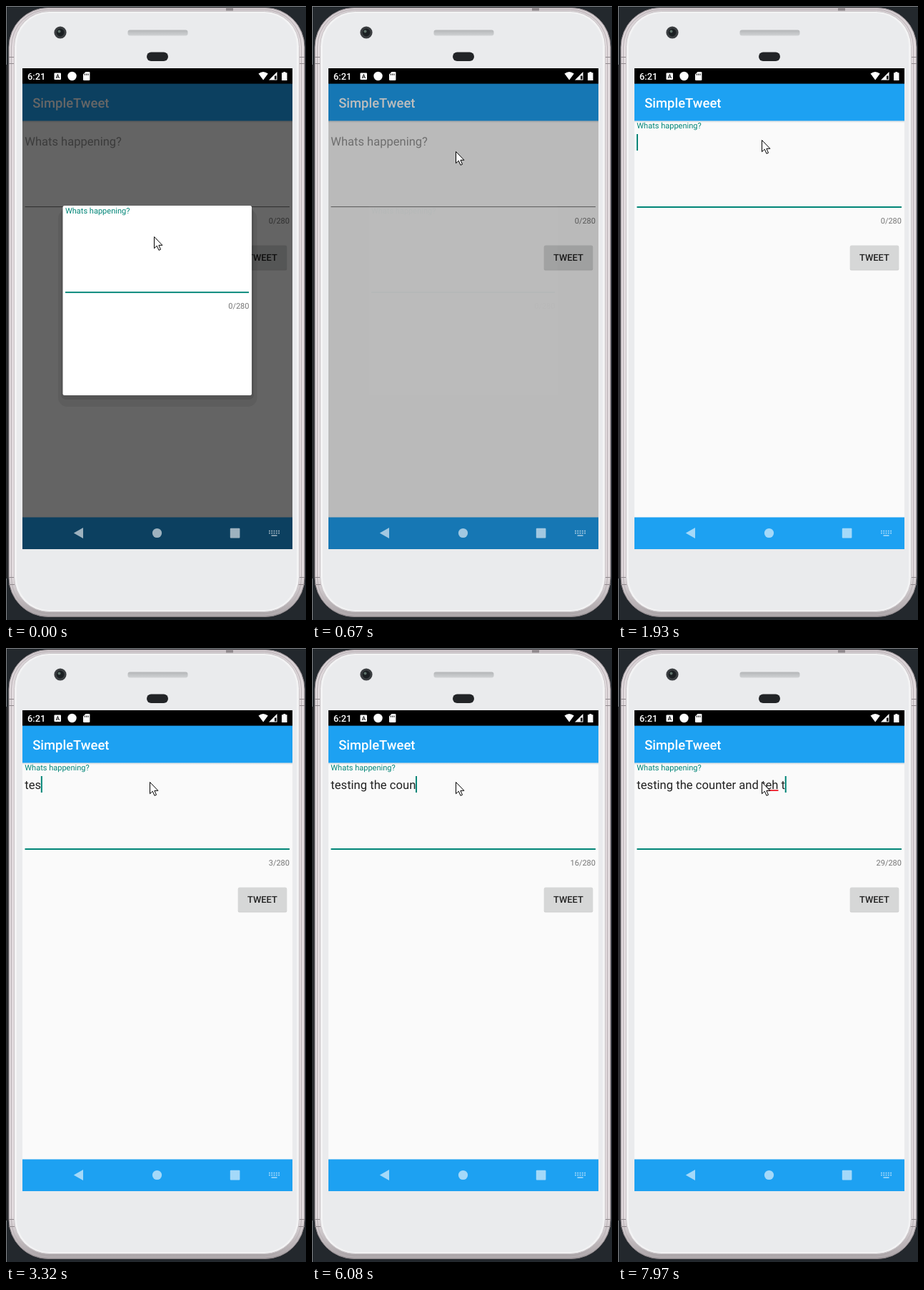
Recreate the animation shown at these times as an HTML page. Size 420 px wide and 858 px high, loop 8000 ms.

```html
<!DOCTYPE html>
<html lang="en">
<head>
<meta charset="utf-8">
<title>Compose screen</title>
<style>
html, body { margin: 0; width: 100%; height: 100%; overflow: hidden; background: #23282d; }
svg { display: block; width: 100%; height: 100%; }
text { font-family: Roboto, sans-serif; white-space: pre; text-rendering: geometricPrecision; }
.medium { font-weight: 500; }
.small { font-size: 11.03px; }
.body { font-size: 16.64px; }
.count { fill: #757575; text-anchor: end; }
.teal { fill: #008577; }
</style>
</head>
<body>
<svg viewBox="0 0 420 858" preserveAspectRatio="none">
  <defs>
    <linearGradient id="rim" x2="0" y2="1">
      <stop offset="0" stop-color="#d3ccd0"/><stop offset=".06" stop-color="#e2dbde"/>
      <stop offset=".93" stop-color="#e2dbde"/><stop offset="1" stop-color="#a8a2a5"/>
    </linearGradient>
    <linearGradient id="slot" x2="0" y2="1">
      <stop offset="0" stop-color="#b4b6b8"/><stop offset="1" stop-color="#d0d2d4"/>
    </linearGradient>
    <linearGradient id="barShade" x2="0" y2="1">
      <stop offset="0" stop-opacity=".13"/><stop offset="1" stop-opacity="0"/>
    </linearGradient>
  </defs>

  <!-- phone -->
  <rect width="420" height="858" fill="#23282d"/>
  <path d="M0 .5H420M.5 0V858" stroke="#85878a" fill="none"/>
  <path d="M1.5 82V800" stroke="#2c2d30" stroke-width="3"/>
  <rect x="4" y="2.5" width="414" height="851" rx="55" fill="url(#rim)" stroke="#8d8589"/>
  <rect x="7.5" y="5" width="406" height="846" rx="52" fill="none" stroke="#b9b1b5"/>
  <path d="M4 71.5H12M4 80.5H12M409 71.5H418M409 80.5H418M4 798.5H12M4 808.5H12M409 798.5H418M409 808.5H418" stroke="#8f888c"/>
  <path d="M308 4.5H318" stroke="#8f888c" stroke-width="4"/>
  <rect x="11.5" y="7.5" width="399" height="839" rx="49" fill="#f3f3f4" stroke="#c9c4c7"/>
  <rect x="15" y="10" width="392" height="834" rx="46" fill="#eaebed"/>
  <circle cx="76" cy="37" r="8.6" fill="#3b3e41"/>
  <circle cx="76" cy="37" r="5.4" fill="#1b1f22"/>
  <circle cx="74.5" cy="35.5" r="2" fill="#5d7068"/>
  <rect x="170.5" y="33.5" width="84" height="8" rx="3" fill="url(#slot)"/>
  <rect x="197" y="64.5" width="30" height="12.5" rx="6.2" fill="#222427"/>

  <!-- app -->
  <rect x="23" y="87" width="378" height="672" fill="#fafafa"/>
  <rect x="23" y="160.4" width="378" height="3" fill="url(#barShade)"/>
  <path d="M23 108H401V160.4H23ZM23 714.4H401V759H23Z" fill="#1da1f2"/>
  <text class="medium" x="37.2" y="141.6" font-size="18.45" fill="#fff">SimpleTweet</text>
  <text id="label">Whats happening?</text>
  <rect id="line" x="26.5" width="370.5"/>
  <text id="typed" class="body" x="26.3" y="197" fill="#212121"></text>
  <rect id="typo" y="198" height="2" fill="#f0303c"/>
  <rect id="caret" class="teal" y="179" width="2" height="23"/>
  <text id="count" class="small count" x="397" y="304"></text>
  <rect x="324.7" y="335" width="68.6" height="34.6" rx="2" opacity=".16"/>
  <rect x="325" y="334.5" width="68" height="33.5" rx="2" fill="#d6d7d7"/>
  <text class="medium" x="338" y="356.2" font-size="12.87" fill="#212121">TWEET</text>

  <!-- dialog -->
  <rect id="dim" x="23" y="108" width="378" height="651"/>
  <g id="dialog">
    <rect x="73" y="284" width="278.5" height="276" rx="13" opacity=".07"/>
    <rect x="77" y="281" width="270" height="269" rx="7" opacity=".1"/>
    <rect x="79.5" y="279" width="264.5" height="265" rx="2.5" fill="#fff"/>
    <text class="small teal" x="83" y="290">Whats happening?</text>
    <rect class="teal" x="83" y="399.2" width="257" height="1.9"/>
    <text class="small count" x="340.5" y="423">0/280</text>
  </g>

  <!-- status bar -->
  <rect x="23" y="87" width="378" height="21.6"/>
  <g fill="#fff">
    <text class="medium" x="30" y="103" font-size="12.87">6:21</text>
    <rect x="67.5" y="93.5" width="9.5" height="9.5" rx="1"/>
    <circle cx="92.5" cy="98" r="6.2"/>
    <path d="M111.5 92H116.2Q117.4 92 117.4 93.2V102.8Q117.4 104 116.2 104H109.2Q108 104 108 102.8V95.5Z"/>
    <path d="M353.5 94.6Q360 89.6 366.8 94.6L360.2 103.4Z"/>
    <path d="M379.5 92V103.5H368Z"/>
    <path d="M388.3 92H391.3V93.3H393.5V104H386V93.3H388.3Z"/>
  </g>
  <text class="medium" x="72.3" y="101.2" font-size="8" text-anchor="middle">A</text>
  <path d="M376 97.5H378.5V102.5H376Z"/>
  <path d="M110.3 94.6V96.8M112.7 94.6V96.8M115 94.6V96.8" stroke="#000"/>

  <!-- navigation bar -->
  <g fill="#fff" opacity=".6">
    <path d="M94.8 736.5L108 729V744Z"/>
    <circle cx="211.5" cy="736.5" r="6.6"/>
    <rect x="313.8" y="729.8" width="13.6" height="13.6" rx="1"/>
    <g id="keys" fill="none" stroke="#fff" stroke-width="1.6">
      <path d="M368 733.6H383M368 736.6H383" stroke-dasharray="1.8 1.5"/>
      <path d="M371.5 740H379.5"/>
    </g>
  </g>

  <path id="mouse" d="M0 0V16.2L3.8 12.7L6.5 18.8L9 17.7L6.4 11.8H11.4Z" fill="#fff" stroke="#000" stroke-linejoin="round"/>
</svg>
<script>
const LOOP = 8000;
const $ = id => document.getElementById(id);
const set = (id, attrs) => {
  for (const key in attrs) $(id).setAttribute(key, attrs[key]);
};
const show = (id, on) => set(id, { visibility: on ? 'visible' : 'hidden' });
const mix = (a, b, p) => a + (b - a) * p;

// Last value whose start time has been reached
const at = (track, t) => {
  let value = track[0][1];
  for (const [start, v] of track) if (t >= start) value = v;
  return value;
};

const pointer = [[0, [207, 322]], [250, [206, 290]], [390, [203, 236]], [530, [201, 203]],
  [820, [201, 197]], [940, [201, 191]], [1350, [201, 187]]];
const dim = [[0, .6], [670, .26], [820, 0]];
const dialog = [[0, 1], [670, .02], [820, 0]];
const floated = [[0, 0], [1780, .45], [1910, 1]];
const caretOn = [[0, false], [1910, true], [2330, false], [2890, true], [6750, false], [7030, true]];

// Typed length over time, for each draft of the sentence
const before = 'testing teh ';
const after = 'testing the counter and teh t';
const length = [[0, 0],
  [3170, 1], [3320, 3], [3440, 4], [3570, 5], [3700, 6], [3840, 7], [3980, 8],
  [4290, 9], [4440, 11], [4590, 12],
  [4970, 11], [5110, 9], [5250, 8], [5390, 9], [5530, 11], [5680, 12], [5820, 13], [5960, 15],
  [6080, 16], [6200, 17], [6320, 19],
  [7030, 20], [7160, 21], [7300, 23], [7430, 24], [7570, 25], [7700, 27], [7840, 28], [7970, 29]];

const pen = document.createElement('canvas').getContext('2d');
const widthOf = s => {
  pen.font = '16.64px Roboto, sans-serif';
  return pen.measureText(s).width;
};

function draw(t) {
  const [mx, my] = at(pointer, t);
  set('mouse', { transform: `translate(${mx + .5} ${my + .5})` });
  set('dim', { opacity: at(dim, t) });
  set('dialog', { opacity: at(dialog, t) });
  show('keys', t < 820 || t >= 1910);

  const focus = t >= 1780;
  const p = at(floated, t);
  set('label', {
    x: 26.3, y: mix(195, 170.6, p),
    'font-size': mix(16.54, 11.03, p),
    fill: focus ? '#008577' : '#949494'
  });
  set('line', {
    y: focus ? 280 : 280.1, height: focus ? 2 : 1,
    fill: focus ? '#008577' : '#757575'
  });

  const text = (t < 5250 ? before : after).slice(0, at(length, t));
  $('typed').textContent = text;
  $('count').textContent = text.length + '/280';
  set('caret', { x: 26.3 + widthOf(text) - .3 });
  show('caret', at(caretOn, t));

  const slip = text.indexOf('teh ');
  show('typo', slip >= 0);
  if (slip >= 0) set('typo', { x: 26.3 + widthOf(text.slice(0, slip)), width: widthOf('teh') });
}

function tick() {
  draw(performance.now() % LOOP);
  requestAnimationFrame(tick);
}
tick();
</script>
</body>
</html>
```
